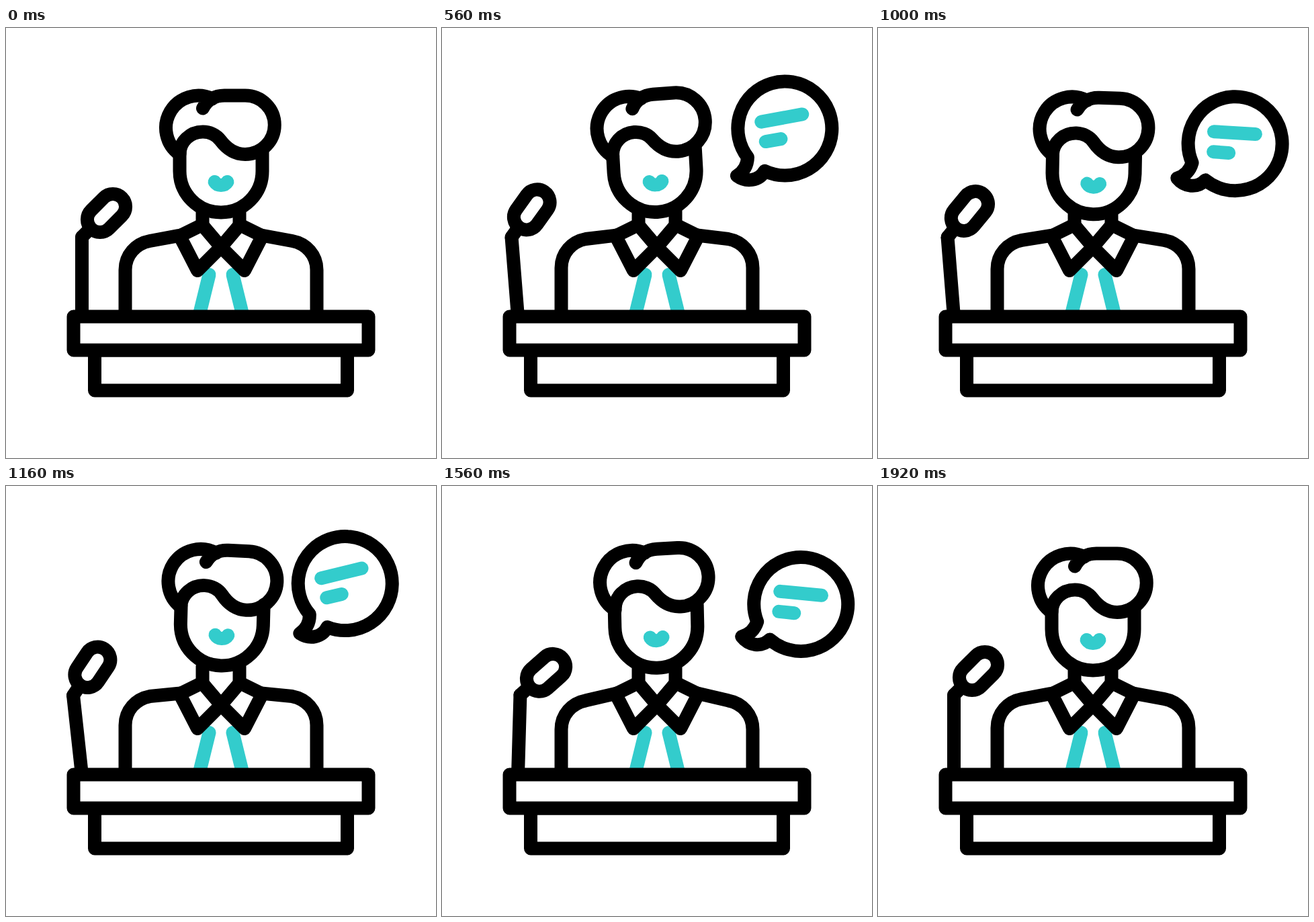
An HTML page that plays this animation: 640x640 px, repeating every 2040 ms.

```html
<!DOCTYPE html>
<html lang="en">
<head>
<meta charset="utf-8">
<title>Speaker at a podium</title>
<style>
  html, body { margin: 0; width: 100%; height: 100%; overflow: hidden; background: #fff; }
  svg { display: block; width: 100%; height: 100%; }
  .ink, .teal { fill: none; stroke: #000; stroke-width: 20; stroke-linecap: round; stroke-linejoin: round; }
  .teal { stroke: #33cccc; }
  .solid { fill: #fff; }
</style>
</head>
<body>
<svg viewBox="0 0 640 640">
  <g id="bubble" opacity="0">
    <path class="ink solid" d="M463 197A70 70 0 1 1 485 221C474 235 455 234 443 222C455 217 461 208 463 197Z"/>
    <path class="teal" d="M491 148L553 146M493 178L516 177.5"/>
  </g>

  <g id="stem" class="ink">
    <path d="M113 430V311"/>
    <g id="mic">
      <path d="M113 311L125 299"/>
      <rect class="solid" x="117" y="256.5" width="65" height="38" rx="19" transform="rotate(-45 149.5 275.5)"/>
    </g>
  </g>

  <path class="teal" d="M302.5 367L287 430M337.5 367L353 430"/>
  <path id="shoulders" class="ink"/>
  <path class="ink" d="M292.5 268V293M347.5 268V293"/>
  <path class="ink" d="M292 293L258.5 309.5L285 361L320 326ZM348 293L381.5 309.5L355 361L320 326Z"/>

  <g id="face">
    <path class="ink solid" d="M258.5 186V213a61.5 61.5 0 0 0 123 0V182"/>
    <path class="teal" d="M310.6 229q3 4.9 9.4 4.9t9.4 -4.9"/>
  </g>
  <path id="hair" class="ink" d="M293 119.5C299 107.5 311 100.5 325 100.5H356A43.75 43.75 0 0 1 356 188C340 188 328 179 319 167C313 159 303 154.5 293 154.5C274 154.5 258.5 169 258.5 188A48 48 0 0 1 307 105.5"/>

  <path class="ink solid" d="M132 479.5H508V539.5H132Z"/>
  <path class="ink solid" d="M100.5 429.5H539.5V479.5H100.5Z"/>
</svg>
<script>
const LOOP = 2040, STEP = 40, LEAD = 230;

const $ = id => document.getElementById(id);
const set = (id, name, value) => $(id).setAttribute(name, value);
const clamp = x => Math.max(0, Math.min(1, x));
const ease = x => (1 - Math.cos(Math.PI * clamp(x))) / 2;

// Swings from rest to a, b, a, ... and back to rest.
// Turns come every `half` ms; each one is `decay` times the size of the last.
function swing(t, { first, half, turns = 4, a, b, decay = 1 }) {
  const peak = i => i < 0 || i >= turns ? 0 : (i % 2 ? b : a) * decay ** i;
  const i = Math.max(-1, Math.min(turns - 1, Math.floor((t - first) / half)));
  const from = i < 0 ? first - LEAD : first + i * half;
  const span = i < 0 || i === turns - 1 ? LEAD : half;
  return peak(i) + (peak(i + 1) - peak(i)) * ease((t - from) / span);
}

const moves = {
  stem:   { first: 460, half: 320, a: -7.3, b: 5 },
  mic:    { first: 530, half: 320, a: -5, b: 2.3 },
  shrug:  { first: 480, half: 330, a: -4, b: 3.5 },
  bubble: { first: 645, half: 280, a: -15.2, b: 7 },
  nod:    { first: 440, half: 240, turns: 6, a: 6, b: -7 },
  sway:   { first: 600, half: 500, turns: 3, a: -8.4, b: 6.2, decay: 0.62 },
  tilt:   { first: 630, half: 480, turns: 3, a: -5.5, b: 4.1, decay: 0.74 },
  lift:   { first: 720, half: 430, turns: 3, a: -4.5, b: 2.5, decay: 0.8 }
};

function shoulderPath(s) {
  const side = x => `M${x(177.5)} 430V${360 + s}C${x(177.5)} ${338 + s} ${x(193)} ${321 + s} ${x(214)} ${317 + s}L${x(260)} 308.5`;
  return side(x => x) + side(x => 640 - x);
}

function draw(t) {
  const v = name => swing(t, moves[name]);
  const sway = v("sway"), nod = v("nod");
  set("stem", "transform", `rotate(${v("stem")} 113 430)`);
  set("mic", "transform", `rotate(${v("mic")} 113 311)`);
  set("shoulders", "d", shoulderPath(v("shrug")));
  set("face", "transform", `translate(${sway * 0.36} ${nod}) rotate(${sway * 0.42} 320 215)`);
  set("hair", "transform", `translate(${sway} ${nod + v("lift")}) rotate(${v("tilt")} 320 145)`);
  set("bubble", "transform", `rotate(${v("bubble") + 2} 428 248)`);
  set("bubble", "opacity", clamp(Math.min(t - 398, 1790 - t) / 100));
}

const start = performance.now();
function tick() {
  const t = (performance.now() - start) % LOOP;
  draw(Math.floor(t / STEP) * STEP);
  requestAnimationFrame(tick);
}
draw(0);
requestAnimationFrame(tick);
</script>
</body>
</html>
```
